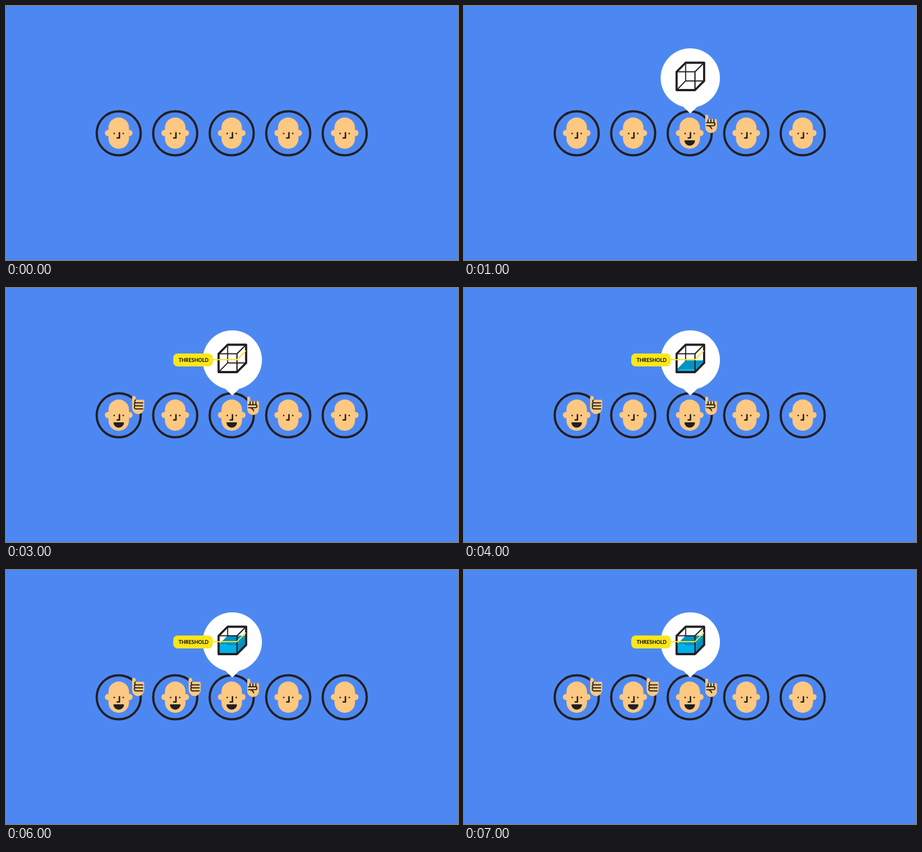
An HTML page for the animation above (8000 ms loop, 800x450 px).

```html
<!DOCTYPE html>
<html lang="en">
<head>
<meta charset="utf-8">
<title>Threshold</title>
<style>
  html, body { margin: 0; width: 100%; height: 100%; overflow: hidden; background: #4d88f2; }
  svg { display: block; width: 100vw; height: 100vh; }
  .skin { fill: #fdc881; }
  .ink { fill: #231f20; }
  .line { fill: none; stroke: #231f20; stroke-linecap: round; stroke-linejoin: round; }
  .label { font: 700 8.9px Lato, "Open Sans", sans-serif; text-anchor: middle; }
</style>
</head>
<body>
<svg viewBox="0 0 800 450">
  <defs>
    <g id="face">
      <circle class="line" r="39" stroke-width="4"/>
      <circle class="skin" cx="-19" cy="-.5" r="5.5"/>
      <circle class="skin" cx="19" cy="-.5" r="5.5"/>
      <rect class="skin" x="-18.2" y="-28" width="36.4" height="55.5" rx="18.2"/>
      <circle class="ink" cx="-8" cy=".4" r="1.3"/>
      <circle class="ink" cx="8" cy=".4" r="1.3"/>
      <path class="line" d="M1.3-1V8.3H-2.7" stroke-width="2.6"/>
    </g>
    <path id="smile" class="ink" d="M-9.3 12.5H9.3V13A9.3 9 0 0 1-9.3 13Z"/>
    <g id="thumb">
      <path class="skin" d="M23.7-31A3.2 3.2 0 0 1 30.1-31V-27.5H43.2Q45-27.5 45-25.5V-12A10.7 10.7 0 0 1 23.7-12Z"/>
      <path class="line" stroke-width="1.9" d="M42.5-22H30.2Q27.2-22 27.7-19.3Q28-16.7 30.5-16.7
        M42.5-16.7H30Q27.2-16.7 27.7-14Q28-11.2 31-11.2H42.5M30.2-22Q26.7-24.5 29.5-27"/>
    </g>
    <g id="point">
      <path class="skin" d="M27.5-30.5A2.6 2.6 0 0 1 32.7-30.5V-25H46.5Q48.2-25 48.2-23V-10.8A10.3 10.3 0 0 1 27.5-10.8Z"/>
      <path class="line" stroke-width="1.9" d="M32.5-24V-19M37.6-24V-19M42.8-24V-19
        M29.5-18.8H42.5Q44.7-18.8 44.7-16.2Q44.7-13.4 41.5-13.4H29.7M33.5-13.2Q37.5-12 39-8"/>
    </g>
  </defs>
  <g id="row"></g>
  <g id="bubble">
    <circle cx="400.5" cy="127.5" r="52.5" fill="#fff"/>
    <path d="M386 176.5L400.5 190.5L415 176.5Z" fill="#fff"/>
    <path class="line" stroke-width="1.9" d="M392.3 100.5V132.7H425M376.3 149L392.3 132.7"/>
    <path id="surface" fill="#0093c2"/>
    <path id="side" fill="#0093c2"/>
    <path id="front" fill="#00b0ea"/>
    <path class="line" stroke-width="2.2" d="M376.3 116.5H408.8V149M408.8 116.5L425 100.5"/>
    <path class="line" stroke-width="3.8" d="M376.3 116.5L392.3 100.5H425V132.7L408.8 149H376.3Z"/>
  </g>
  <g id="mark">
    <path d="M364 127H408.8L424.5 111" fill="none" stroke="#fbe61a" stroke-width="2"/>
    <rect x="296" y="116" width="70" height="23" rx="8" fill="#fbe61a"/>
    <text class="label" x="332" y="130.8">THRESHOLD</text>
  </g>
</svg>
<script>
const LOOP = 8000;
const el = id => document.getElementById(id);

// When each person joins, and the hand they raise.
const people = [
  [3000, 'thumb'], [5000, 'thumb'], [1000, 'point'], [Infinity], [Infinity]
];

el('row').innerHTML = people.map(([, hand], i) => `
  <g transform="translate(${199.5 + i * 100} 225.5)">
    <use href="#face"/>
    ${hand ? `<g id="joined${i}"><use href="#smile"/><use href="#${hand}"/></g>` : ''}
  </g>`).join('');

const cues = [[el('bubble'), 1000], [el('mark'), 2000]];
people.forEach(([at, hand], i) => hand && cues.push([el('joined' + i), at]));

const levels = [[0, 0], [4000, 4.5], [5000, 10], [6000, 16.5]];

function fill(h) {
  const near = 149 - h, far = 132.7 - h;
  const draw = (id, d) => el(id).setAttribute('d', h ? d : '');
  draw('surface', `M376.3 ${near}L392.3 ${far}H425L408.8 ${near}Z`);
  draw('side', `M408.8 ${near}L425 ${far}V132.7L408.8 149Z`);
  draw('front', `M376.3 ${near}H408.8V149H376.3Z`);
}

function render(t) {
  for (const [node, at] of cues) node.style.display = t >= at ? '' : 'none';
  fill(levels.filter(([at]) => t >= at).pop()[1]);
}

const start = performance.now();
function tick() {
  render((performance.now() - start) % LOOP);
  requestAnimationFrame(tick);
}
render(0);
requestAnimationFrame(tick);
</script>
</body>
</html>
```
